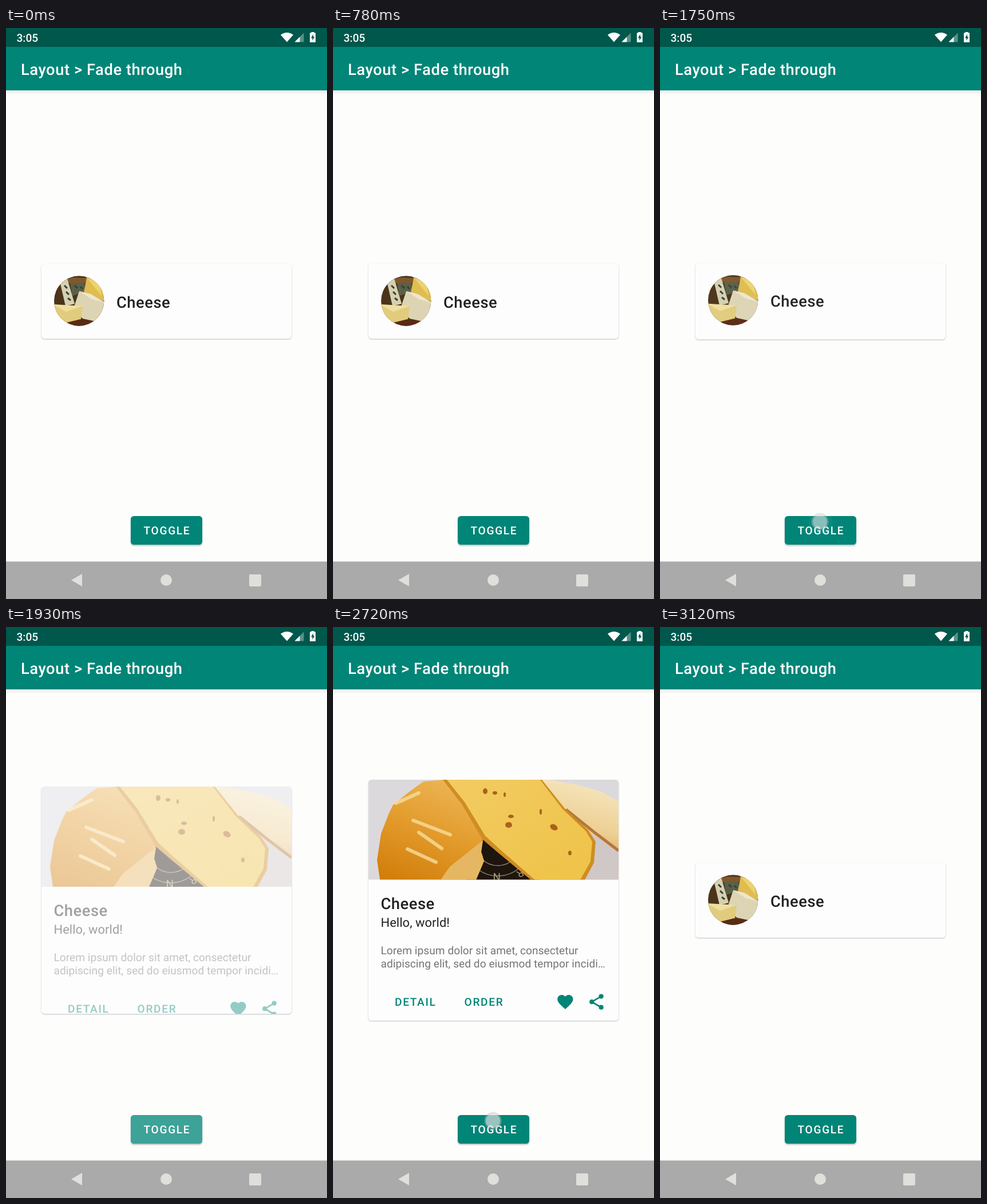
These frames come from a looping animation (561 px wide and 998 px high, 3410 ms). An HTML page:

```html
<!DOCTYPE html>
<html lang="en">
<head>
<meta charset="utf-8">
<title>Layout: fade through</title>
<style>
  html, body { margin: 0; width: 100%; height: 100%; overflow: hidden; background: #fdfdfc; }
  svg { display: block; font-family: Roboto, sans-serif; text-rendering: geometricPrecision; }
  .title { font-size: 27.3px; font-weight: 500; letter-spacing: .55px; }
  .label { font-size: 19.1px; font-weight: 500; letter-spacing: 1.7px; }
  .ink { fill: #202020; }
  .teal { fill: #008577; }
</style>
</head>
<body>
<svg width="561" height="998" viewBox="0 0 561 998">
  <defs>
    <clipPath id="cardClip"><rect id="cardClipRect" width="437" rx="5.5"/></clipPath>
    <clipPath id="avatarClip"><circle cx="65.7" cy="65" r="43.7"/></clipPath>
    <clipPath id="photoClip"><rect width="437" height="174.5"/></clipPath>
    <clipPath id="buttonClip"><rect x="218" y="853" width="125" height="50" rx="5.5"/></clipPath>
    <linearGradient id="rind" x1=".6" y1="0" x2=".2" y2="1">
      <stop offset="0" stop-color="#ecb352"/><stop offset=".5" stop-color="#e29a2a"/><stop offset="1" stop-color="#d27f0c"/>
    </linearGradient>
    <linearGradient id="paste" x1="0" y1="0" x2="1" y2="1">
      <stop offset="0" stop-color="#f2cb62"/><stop offset="1" stop-color="#efc348"/>
    </linearGradient>
    <linearGradient id="pale" x1=".6" y1="0" x2=".3" y2="1">
      <stop offset="0" stop-color="#f6e6bd"/><stop offset=".6" stop-color="#edcf93"/><stop offset="1" stop-color="#d6a260"/>
    </linearGradient>
    <linearGradient id="barShade" x2="0" y2="1">
      <stop offset="0" stop-opacity=".07"/><stop offset="1" stop-opacity="0"/>
    </linearGradient>
  </defs>

  <rect width="561" height="998" fill="#fdfdfc"/>
  <rect y="109" width="561" height="8" fill="url(#barShade)"/>
  <rect width="561" height="109" class="teal"/>
  <rect width="561" height="33" fill="#00574b"/>
  <g fill="#fff">
    <text x="18.5" y="24" font-size="19.1" font-weight="500">3:05</text>
    <path d="M480 12Q491 4 502 12L491 24.500Z"/>
    <path d="M504.500 24.500L520.500 8.500V24.500Z" opacity=".35"/>
    <path d="M504.500 24.500L513.500 15.500V24.500Z"/>
    <path d="M533.500 8.500V7H538.500V8.500H541V25H531V8.500Z"/>
    <path d="M537 11L533 17.500H535.500V22L539.300 15.500H537Z" fill="#00574b"/>
    <text x="26" y="81.500" class="title">Layout &gt; Fade through</text>
  </g>

  <rect id="card" x="62" width="437" rx="5.5" fill="#fdfdfd"
        style="filter:drop-shadow(0 1px 1px rgba(0,0,30,.25))"/>
  <g id="cardBody"><g clip-path="url(#cardClip)">
    <g id="collapsed">
      <g clip-path="url(#avatarClip)">
        <rect x="20" y="20" width="92" height="92" fill="#4b3419"/>
        <path d="M20 34L56 24 80 25 75 36 50 34Z" fill="#80582c"/>
        <path d="M50 34L75 33 76 49 54 56Z" fill="#596049"/>
        <path d="M33 35L45 26 58 70 42 74Z" fill="#d5d0b2"/>
        <path d="M40 38l5 5M43 49l5 5M46 60l5 4M58 38l5 5M68 40l4 4" stroke="#364035" stroke-width="3"/>
        <path d="M79 24L108 38 110 66 74 50Z" fill="#dfbd50"/>
        <path d="M79 24L101 32 105 56Z" fill="#edd36f"/>
        <path d="M66 48L86 53 112 68 104 97 81 106 56 78Z" fill="#ddd4b4"/>
        <path d="M66 48L86 53 110 68 88 62Z" fill="#eee6cc"/>
        <path d="M20 71L48 76 72 74 69 98 33 106 20 91Z" fill="#e1cb7d"/>
        <path d="M20 71L72 74 43 84Z" fill="#efdf9e"/>
        <path d="M35 105L72 96 100 102 80 112H45Z" fill="#592b15"/>
      </g>
      <text x="131" y="76.500" class="title ink">Cheese</text>
    </g>
    <g id="expanded">
      <g clip-path="url(#photoClip)">
        <rect width="437" height="175" fill="#dcd9dd"/>
        <path d="M330 30L437 110V175H370Z" fill="#d0c8c6"/>
        <path d="M170 70L300 175H170Z" fill="#1d150e"/>
        <g fill="none" stroke="#8b8065" stroke-width="1.5">
          <circle cx="226" cy="110" r="58"/><circle cx="226" cy="110" r="40"/>
        </g>
        <text transform="translate(231 163) rotate(180)" font-size="19" fill="#a89b7c">N</text>
        <text transform="translate(267 156) rotate(150)" font-size="17" fill="#a89b7c">R</text>
        <path d="M280 0H316L365 9 405 20 437 38V126L400 100 330 60Z" fill="url(#pale)"/>
        <path d="M345 52L395 92 437 124" fill="none" stroke="#b4783a" stroke-width="5"/>
        <path d="M43 44L70 22 96 3 132 0H160L200 90V104L197 126 202 142 188 175H20L15 140 22 94 36 58Z" fill="url(#rind)"/>
        <path d="M126 175L142 152 200 106 197 126 202 142 188 175Z" fill="#e6b762"/>
        <g fill="none" stroke="#f8e2a2" stroke-width="6" stroke-linecap="round" opacity=".75">
          <path d="M48 41L88 23M78 71L143 96M88 92L128 120M68 121L118 144"/>
        </g>
        <path d="M130 0H303L343 50 384 88 397 108 394 145 378 175H284L226 127 199 104 164 44Z" fill="#cf8d22"/>
        <path d="M137 0H300L339 51 380 90 391 108 388 143 370 175H291L229 121 204 98 168 39Z" fill="url(#paste)"/>
        <g fill="#a9621a">
          <ellipse cx="204" cy="20" rx="4" ry="5"/><ellipse cx="221" cy="23" rx="4" ry="3"/>
          <ellipse cx="238" cy="26" rx="2" ry="4"/><ellipse cx="249" cy="64" rx="5" ry="3"/>
          <ellipse cx="245" cy="79" rx="6" ry="5"/><ellipse cx="301" cy="56" rx="2" ry="5"/>
          <ellipse cx="324" cy="83" rx="7" ry="5" transform="rotate(30 324 83)"/><ellipse cx="352" cy="128" rx="3" ry="4"/>
        </g>
      </g>
      <text x="21.500" y="225.500" class="title ink">Cheese</text>
      <text x="21.500" y="256.500" class="ink" font-size="21.8" letter-spacing=".1">Hello, world!</text>
      <g font-size="19.1" letter-spacing=".05" fill="#757575">
        <text x="21.500" y="305">Lorem ipsum dolor sit amet, consectetur</text>
        <text x="21.500" y="327.500">adipiscing elit, sed do eiusmod tempor incidi…</text>
      </g>
      <g class="teal">
        <text x="46" y="395" class="label">DETAIL</text>
        <text x="167.500" y="395" class="label">ORDER</text>
        <path transform="translate(327.500 371.800) scale(1.364)" d="M12 21.350l-1.450-1.320C5.400 15.360 2 12.280 2 8.500 2 5.420 4.420 3 7.500 3c1.740 0 3.410.81 4.500 2.090C13.090 3.810 14.760 3 16.500 3 19.580 3 22 5.420 22 8.500c0 3.780-3.400 6.860-8.550 11.540z"/>
        <g transform="translate(382.100 371.800) scale(1.364)">
          <path d="M18 5L6 12 18 19" fill="none" stroke="#008577" stroke-width="2"/>
          <circle cx="18" cy="5" r="3"/><circle cx="6" cy="12" r="3"/><circle cx="18" cy="19" r="3"/>
        </g>
      </g>
    </g>
  </g></g>

  <rect id="button" x="218" y="853" width="125" height="50" rx="5.5" class="teal"/>
  <g clip-path="url(#buttonClip)"><circle id="ripple" cx="280.5" fill="#fff"/></g>
  <text x="240.500" y="885" class="label" fill="#fff">TOGGLE</text>
  <g id="touch">
    <circle cx="279.500" cy="863" r="15" fill="#bbb" fill-opacity=".45"/>
    <circle cx="279.500" cy="863" r="12.500" fill="#fff" fill-opacity=".4"/>
  </g>

  <rect y="932.5" width="561" height="66" fill="#aaa"/>
  <g fill="#dfdfdb">
    <path d="M114 965L133 954V976Z"/>
    <circle cx="280" cy="965" r="10"/>
    <rect x="425" y="955" width="21" height="21" rx="2"/>
  </g>
</svg>
<script>
const LOOP = 3410, MOVE = 300, RIPPLE_GROW = 225, RIPPLE_FADE = 150;
const taps = [
  { press: 1650, move: 1733, ripple: 1737 },
  { press: 2620, move: 2774, ripple: 2738 },
];
const el = Object.fromEntries([...document.querySelectorAll('[id]')].map(e => [e.id, e]));
const set = (e, attrs) => { for (const k in attrs) e.setAttribute(k, attrs[k]); };
const clamp = v => Math.min(1, Math.max(0, v));
const span = (t, start, length) => clamp((t - start) / length);
const mix = (a, b, p) => a + (b - a) * p;

function bezier(x1, y1, x2, y2) {
  const at = (a, b, u) => 3 * (1 - u) ** 2 * u * a + 3 * (1 - u) * u * u * b + u ** 3;
  return x => {
    if (x <= 0 || x >= 1) return clamp(x);
    let lo = 0, hi = 1;
    for (let i = 0; i < 24; i++) {
      const mid = (lo + hi) / 2;
      if (at(x1, x2, mid) < x) lo = mid; else hi = mid;
    }
    return at(y1, y2, lo);
  };
}
const standard = bezier(.4, 0, .2, 1);
const accelerate = bezier(.4, 0, 1, 1);

function draw(t) {
  const closing = t >= taps[1].press;
  const tap = taps[closing ? 1 : 0];

  // The card resizes while the old content fades out, then the new one in.
  const move = span(t, tap.move, MOVE);
  const open = closing ? 1 - standard(move) : standard(move);
  const top = mix(412, 267, open), height = mix(131, 421, open);
  set(el.card, { y: top, height });
  set(el.cardClipRect, { height });
  set(el.cardBody, { transform: `translate(62 ${top})` });
  const leaving = 1 - accelerate(span(move, 0, .54));
  const entering = standard(span(move, .5, .5));
  set(el.collapsed, { opacity: closing ? entering : leaving });
  set(el.expanded, { opacity: closing ? leaving : entering });

  const grow = standard(span(t, tap.ripple, RIPPLE_GROW));
  const fade = span(t, tap.ripple, 75) * (1 - span(t, tap.ripple + RIPPLE_GROW, RIPPLE_FADE));
  set(el.ripple, { r: mix(20, 68, grow), cy: mix(863, 878, grow), opacity: .24 * fade });

  const lift = span(t, tap.ripple, 100) * (1 - span(t, tap.move + 100, 100));
  el.button.style.filter = `drop-shadow(0 ${2 + lift}px ${1.2 + lift}px rgba(0,0,0,.25))`;
  const held = t >= tap.press ? 1 - span(t, tap.move, 150) : 0;
  set(el.touch, { opacity: held });
}

function tick() {
  draw(performance.now() % LOOP);
  requestAnimationFrame(tick);
}
tick();
</script>
</body>
</html>
```
